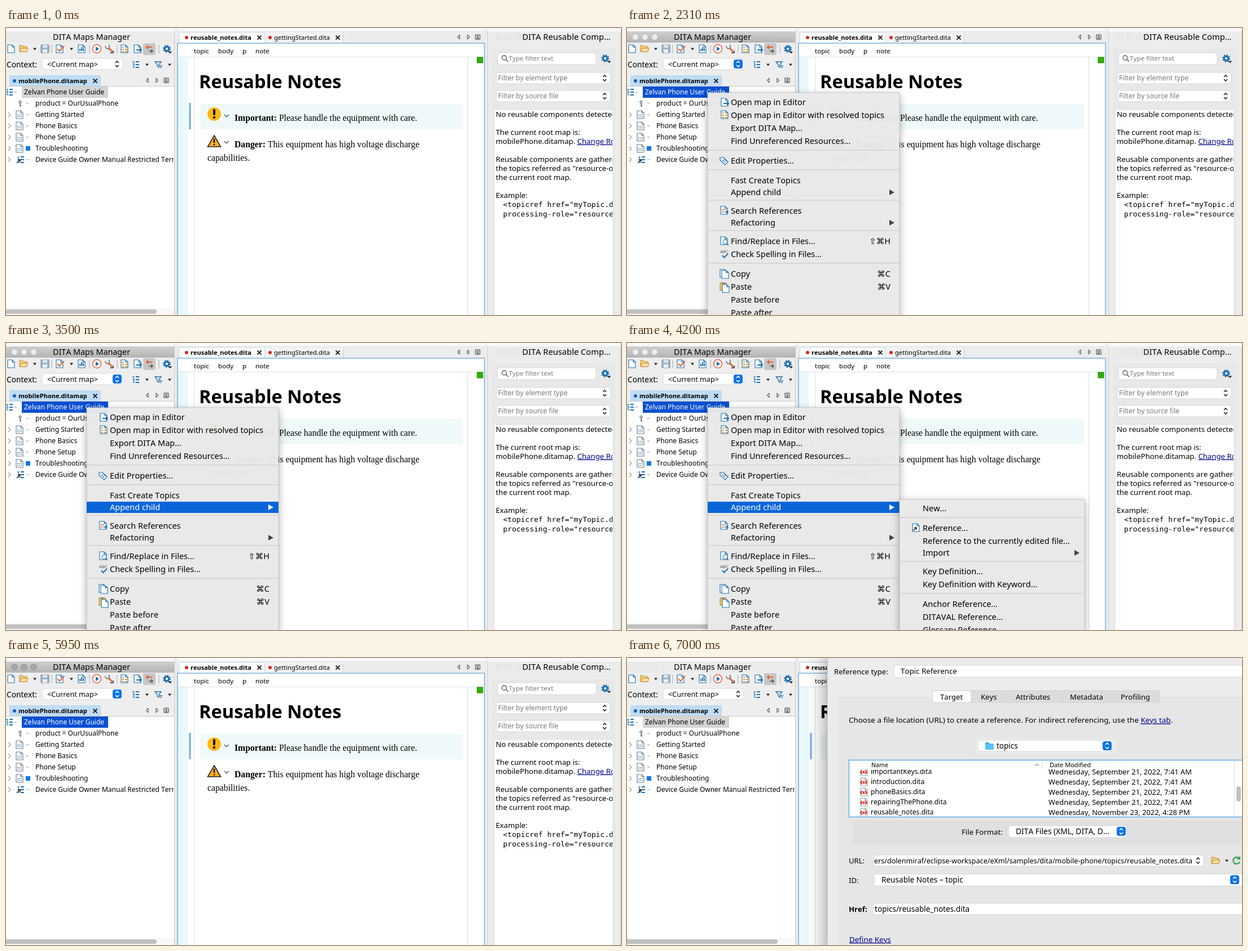
An HTML page that plays this animation: 1090 px wide and 510 px high, repeating every 8 s.

```html
<!DOCTYPE html>
<html lang="en">
<head>
<meta charset="utf-8">
<style>
html, body { margin: 0; width: 100%; height: 100%; overflow: hidden; background: #ececec; }
svg { display: block; width: 1090px; height: 510px; font-family: "Noto Sans", "DejaVu Sans", sans-serif; font-kerning: none; }
text { white-space: pre; }
.b { font-weight: 700; }
.serif { font-family: "Liberation Serif", serif; }
.mono { font-family: "DejaVu Sans Mono", monospace; }
.link { fill: #00008b; text-decoration: underline; }
.popup { filter: drop-shadow(0 4px 7px #0005); }
.sheet { filter: drop-shadow(0 8px 18px #0007); }
.item > .bar { fill: none; }
.on > .bar { fill: #0a66d8; }
.on > text, .on > .arrow { fill: #fff; }
</style>
</head>
<body>
<svg id="stage" viewBox="0 0 1090 510"></svg>
<script>
const BLUE = '#1b6fae', ORANGE = '#e0633a';

// Shape helpers; T takes the vertical centre of its capitals.
const T = (x, y, s, size = 12, attrs = '') =>
  `<text x="${x}" y="${y + size * .36}" font-size="${size}" ${attrs}>${s}</text>`;
const R = (x, y, w, h, fill, attrs = '') =>
  `<rect x="${x}" y="${y}" width="${w}" height="${h}" fill="${fill}" ${attrs} />`;
const P = (d, stroke, width = 1, fill = 'none') =>
  `<path d="${d}" stroke="${stroke}" stroke-width="${width}" fill="${fill}" />`;
const C = (x, y, r, fill, attrs = '') => `<circle cx="${x}" cy="${y}" r="${r}" fill="${fill}" ${attrs} />`;
const G = (id, body, attrs = '') => `<g id="${id}" ${attrs}>${body}</g>`;
const clip = (id, x, y, w, h, body) =>
  `<clipPath id="${id}">${R(x, y, w, h, '#000')}</clipPath><g clip-path="url(#${id})">${body}</g>`;

// Widgets
const field = (x, y, w, h, r = 5) => R(x, y, w, h, '#fff', `rx="${r}" stroke="#cfcfcf" stroke-width=".8"`);
const spin = (x, y, blue) => (blue ? R(x - 8, y - 8, 16, 16, '#0b72e7', 'rx="4"') : '') +
  P(`M${x - 3} ${y - 2}l3-3 3 3m0 4l-3 3-3-3`, blue ? '#fff' : '#222', 1.6);
const caret = (x, y) => P(`M${x - 3} ${y - 1.5}h6l-3 4z`, 'none', 0, '#222');
const cross = (x, y) => P(`M${x - 3.5} ${y - 3.5}l7 7m0-7l-7 7`, '#222', 1.8);
const tabTools = (x, y) => P(`M${x + 2} ${y - 4}v8l-4-4zM${x + 16} ${y - 4}v8l4-4z`, '#333') +
  P(`M${x + 30} ${y - 4}h8v8h-8zm2 2.5h4m-4 2h4m-4 2h4`, '#333');
const lights = (x, fill, stroke) => [0, 17, 34].map(d => C(x + d, 16, 5.5, fill, `stroke="${stroke}"`)).join('');

// Icons
const page = (x, y, color = BLUE) => P(`M${x} ${y}h8l4 4v10h-12zm8 0v4h4`, color, 1.1, '#fff');
const topic = (x, y) => page(x, y, '#6f7780') + P(`M${x + 2} ${y + 7.5}h2m1 0h2m1 0h2m-8 3h2m1 0h2m1 0h2`, BLUE);
const docArrow = (x, y, color = BLUE) => page(x, y) + P(`M${x + 4} ${y + 9}h9m-3-3l3 3-3 3`, color, 1.8);
const docList = (x, y) => page(x, y) + P(`M${x + 2} ${y + 4}h3m-3 4h3m2 0h4m-9 4h3m2 0h4`, '#e9981d', 2);
const folder = (x, y) => P(`M${x} ${y}h5l2 2h6v9h-13z`, '#b98b35', 1, '#f7cf73') +
  P(`M${x} ${y + 11}l3-6h12l-2 6z`, '#b98b35', 1, '#fbe0a0');
const wrench = (x, y) => P(`M${x} ${y + 2}a4 4 0 0 0 6 4a4 4 0 0 0 0-6`, '#777', 1.8) +
  P(`M${x + 6} ${y + 6}l6 6`, ORANGE, 3) + P(`M${x + 9} ${y + 14}h5v-4`, '#222', 1.4);
const gear = (x, y) => C(x, y, 3.8, 'none', `stroke="${BLUE}" stroke-width="3"`) +
  C(x, y, 6, 'none', `stroke="${BLUE}" stroke-width="2" stroke-dasharray="2.4 2.3"`);
const tree = (x, y) => P(`M${x} ${y}h4m-2 0v10h3m-3-5h3`, BLUE, 1.2) +
  P(`M${x + 6} ${y}h6m-6 5h6m-6 5h6`, BLUE, 1.8);
const funnel = (x, y) => P(`M${x} ${y}h11l-4 5v5l-3-2v-3zm8 7h5m-4 3h3`, BLUE, 1.3);

function mapsManager() {
  const rows = ['Getting Started', 'Phone Basics', 'Phone Setup', 'Troubleshooting',
    'Device Guide Owner Manual Restricted Terms'];
  const toolbar = page(3, 30) + folder(24, 31) + caret(51, 37) +
    R(62, 30, 14, 14, '#9db4c8', 'rx="1" stroke="#71889d"') + R(65, 30, 8, 5, '#dbe5ee') + R(65, 38, 8, 6, '#e9eff4') +
    page(89, 30) + P('M91 37l4 4 8-9', ORANGE, 2) + caret(116, 37) +
    page(128, 30) + P('M131 41v-4m3 4v-7m3 7v-5', BLUE, 2) +
    C(161, 37, 7.5, '#fff', `stroke="${ORANGE}" stroke-width="1.5"`) + P('M159 33v8l6-4z', 'none', 0, BLUE) +
    wrench(176, 30) + docList(204, 30) + docArrow(227, 30) +
    R(243, 27, 22, 21, '#c6c6c6', 'rx="3"') + P('M259 34h-10m3-3l-3 3 3 3', ORANGE, 2) +
    P('M253 41h7m-3-3l3 3-3 3', '#555', 1.6) + gear(285, 37) + caret(291, 43) +
    [81, 148, 197, 271].map(x => P(`M${x} 30v15`, '#aaa', 1)).join('');
  const items = rows.map((s, i) => {
    const y = 154 + i * 20, last = i === 4;
    return P(`M4 ${y - 4}l4 4-4 4`, '#999', 1.1) +
      (last ? tree(20, y - 5) + P(`M19 ${y + 6}l6-6m-4 0h4v4`, '#222', 1.4) : topic(18, y - 7)) +
      (i === 3 ? R(35, y - 4, 8, 8, '#0a78e6') : P(`M36 ${y}h4`, '#888')) + T(52, y, s);
  }).join('');
  return '<linearGradient id="steel" x2="0" y2="1"><stop stop-color="#d0d0d0" /><stop offset="1" stop-color="#b4b4b4" /></linearGradient>' +
    R(0, 0, 298, 510, '#eeeeee') + R(0, 0, 298, 6, '#f9f9f9') +
    R(0, 6, 298, 20, '#ebebeb') + G('activeTitle', R(0, 6, 298, 20, 'url(#steel)')) +
    G('dimLights', lights(15, '#ececec', '#e0e0e0')) + G('menuLights', lights(15, '#ededed', '#b8b8b8')) +
    G('onLights', lights(15, '#a6a6a6', '#9a9a9a')) +
    T(83, 16, 'DITA Maps Manager', 14.3) + toolbar +
    T(1, 65, 'Context:', 13.7) + field(64, 54, 143, 20) + T(73, 64, '&lt;Current map&gt;', 12.6) +
    G('plainSpin', spin(197, 64)) + G('blueSpin', spin(197, 64, true)) +
    tree(224, 60) + caret(250, 65) + funnel(264, 60) + caret(290, 65) +
    R(6, 84, 162, 20, '#bfdcf5') + C(15, 94, 3, '#1c5fb0') + T(22, 94, 'mobilePhone.ditamap', 11, 'class="b"') +
    cross(158, 94) + tabTools(250, 93) +
    R(0, 104, 298, 393, '#fff') + P('M0 103.5h298M298.5 6v504', '#c9c9c9') +
    clip('treeClip', 0, 104, 297, 393,
      tree(0, 109) + P('M15 114h4M36 134h4', '#888') +
      G('plainRow', R(28, 104, 153, 20, '#d4d4d4')) + G('blueRow', R(28, 104, 153, 20, '#0a50d2')) +
      `<g id="rootName">${T(32, 114, 'Zelvan Phone User Guide')}</g>` +
      C(25, 131.5, 2, 'none', 'stroke="#333"') + P('M25 134v5h2m-2-2h2', '#333') +
      T(52, 134, 'product = OurUsualPhone') + items) +
    R(0, 497, 298, 13, '#f8f8f8') + R(-5, 500, 272, 8, '#c1c1c1', 'rx="4"');
}

function editor() {
  const chevron = (x, y) => P(`M${x - 4} ${y - 2}l4 4 4-4`, '#444', 1.1);
  return R(304, 0, 545, 26, '#ececec') + R(304, 0, 545, 5, '#f9f9f9') +
    R(307, 8, 151, 19, '#fff') + R(459, 8, 139, 18, '#f2f2f2') + P('M306.5 26v-18h152v18m139-18v18', '#c5d6e5') +
    C(320, 17, 3, '#d9261c') + T(327, 17, 'reusable_notes.dita', 11, 'class="b"') + cross(449, 17) +
    C(468, 17, 3, '#d9261c') + T(475, 17, 'gettingStarted.dita', 11.15) + cross(588, 17) + tabTools(802, 16) +
    R(304, 27, 545, 483, '#fff') + R(305, 52, 17, 458, '#e9f8fc') +
    ['topic:333', 'body:376', 'p:419', 'note:442'].map(s => T(+s.split(':')[1], 41, s.split(':')[0], 11.6)).join('') +
    P('M305 51.5h543', '#d8e3ec') + P('M333.5 52v458M818.5 52v458', '#d3e0ee') +
    R(835, 52, 10, 10, '#30b000', 'stroke="#1d8500"') + P('M304 510V27h544v483', '#7fb1dc', 1.6) +
    T(342, 95, 'Reusable Notes', 32.6, 'class="b"') +
    R(344, 135, 466, 45, '#f0f9f9') + R(324, 133, 4, 47, '#8fbbe8') +
    C(369, 153, 12, '#fdb913') + R(367, 144, 4, 11, '#111', 'rx="1.5"') + C(369, 159, 2.2, '#111') + chevron(391, 156) +
    P('M369 191l11.5 20h-23z', '#222', 1.6, '#fbb01b') + P('M369 197v7m0 2v2.5', '#111', 2.6) + chevron(391, 203) +
    T(405, 159.5, '<tspan class="b">Important:</tspan> Please handle the equipment with care.', 15.7, 'class="serif"') +
    T(405, 206.5, '<tspan class="b">Danger:</tspan> This equipment has high voltage discharge', 15.7, 'class="serif"') +
    T(357, 230.5, 'capabilities.', 15.7, 'class="serif"');
}

function reusePanel() {
  const lines = [[153, 'No reusable components detected.'], [185, 'The current root map is:'],
    [201, 'mobilePhone.ditamap. <tspan class="link">Change Root Map</tspan>'],
    [233, 'Reusable components are gathered from'], [249, 'the topics referred as "resource-only" in'],
    [265, 'the current root map.'], [297, 'Example:']];
  const select = (y, s) => field(869, y - 10, 202, 20) + T(872, y, s, 12.1, 'fill="#777"') + spin(1061, y);
  return R(853, 0, 237, 510, '#ececec') + R(853, 0, 237, 6, '#f9f9f9') +
    P('M853.5 6v504M1089.5 6v504', '#cfcfcf') + lights(874, '#e9e9e9', '#dddddd') +
    T(915, 16, 'DITA Reusable Comp...', 14.7) + R(862, 37, 218, 480, '#e8e8e8', 'rx="4"') +
    field(871, 44, 175, 21) + C(883, 53, 4, 'none', 'stroke="#555" stroke-width="1.3"') + P('M886 56l4 4', '#555', 1.4) +
    T(891, 54, 'Type filter text', 11.65, 'fill="#777"') + gear(1062, 54) + caret(1069, 60) +
    select(89, 'Filter by element type') + select(121, 'Filter by source file') +
    R(866, 146, 209, 364, '#fff') +
    clip('helpClip', 866, 146, 209, 364, lines.map(([y, s]) => T(868, y, s, 13.2)).join('') +
      T(881, 313, '&lt;topicref href="myTopic.dita"', 13, 'class="mono"') +
      T(881, 330, 'processing-role="resource-only"/&gt;', 13, 'class="mono"'));
}

// Items: [centre y, label, right side, icon]
const mainItems = [
  [132, 'Open map in Editor', '', docArrow(167, 125)],
  [155, 'Open map in Editor with resolved topics', '', docList(167, 147)],
  [178, 'Export DITA Map...'], [201, 'Find Unreferenced Resources...'],
  [236, 'Edit Properties...', '', P('M165 230h6l8 8-5 5-9-8zm4 4l5 5m-2-7l5 5', BLUE, 1.2, '#fff')],
  [271, 'Fast Create Topics'], [292, 'Append child', '>'],
  [325, 'Search References', '', page(166, 317) + P('M168 323h6m-6 4h4', ORANGE, 1.5) + P('M173 327h6m-3-3l3 3-3 3', BLUE, 1.5)],
  [346, 'Refactoring', '>'],
  [379, 'Find/Replace in Files...', '⇧⌘H', page(166, 371) + C(174, 380, 4, '#fff', `stroke="${BLUE}"`) + P('M177 383l3 3', BLUE, 1.5)],
  [402, 'Check Spelling in Files...', '', T(165, 397, 'ABC', 7.5, 'style="fill:#555"') + P('M169 404l3 4 7-7', BLUE, 2)],
  [437, 'Copy', '⌘C', page(165, 429) + page(168, 431)],
  [460, 'Paste', '⌘V', R(165, 453, 11, 13, '#f4c765', 'stroke="#a87c2c"') + R(168, 452, 5, 3, '#888') + page(169, 456)],
  [483, 'Paste before'], [506, 'Paste after']];
const subItems = [
  [294, 'New...'], [329, 'Reference...', '', page(506, 321) + P('M507 333l6-5m-4 0h4v4', '#222', 1.5)],
  [352, 'Reference to the currently edited file...'], [373, 'Import', '>'],
  [406, 'Key Definition...'], [429, 'Key Definition with Keyword...'],
  [464, 'Anchor Reference...'], [487, 'DITAVAL Reference...'], [510, 'Glossary Reference...']];

function menu(id, x, y, w, items, rules) {
  const rows = items.map(([cy, label, end = '', icon = ''], i) => {
    const half = end === '>' ? 10 : 11.5;
    const right = end === '>' ? `<path class="arrow" d="M${x + w - 18} ${cy - 5}v10l9-5z" fill="#444" />`
      : T(x + w - 16, cy, end, 14.5, 'text-anchor="end"');
    return G(id + i, R(x, cy - half, w, half * 2, 'none', 'class="bar"') + icon +
      T(x + 41, cy, label, 14.5) + right, 'class="item"');
  }).join('');
  return G(id, R(x, y, w, 520 - y, '#ececec', 'class="popup" fill-opacity=".96" stroke="#bdbdbd" stroke-width=".8"') +
    rules.map(ry => P(`M${x} ${ry}h${w}`, '#d2d2d2', 1.6)).join('') + rows);
}

function dialog() {
  const files = ['importantKeys', 'introduction', 'phoneBasics', 'repairingThePhone', 'reusable_notes'];
  const rows = files.map((name, i) => {
    const y = 202 + i * 18;
    return page(414, y - 7, '#999') + P(`M417 ${y - 2}l-3 3 3 3m5-6l3 3-3 3`, '#d9261c', 1.8) + C(419.5, y + 1, 2, '#d9261c') +
      T(432, y, name + '.dita', 12.1) +
      T(747, y, i < 4 ? 'Wednesday, September 21, 2022, 7:41 AM' : 'Wednesday, November 23, 2022, 4:28 PM', 12.9);
  }).join('');
  const tabs = [[627, 'Keys'], [689, 'Attributes'], [785, 'Metadata'], [875, 'Profiling']];
  return G('dialog', R(355, -10, 760, 540, '#ececec', 'class="sheet" stroke="#b5b5b5"') +
    T(367, 24, 'Reference type:', 13.1) + field(473, 13, 640, 21) + T(485, 23, 'Topic Reference', 13.3) +
    R(375, 69, 720, 450, '#e6e6e6', 'rx="4"') +
    R(541, 58, 403, 21, '#dcdcdc', 'rx="5" stroke="#d0d0d0"') + field(541, 58, 69, 21) + T(555, 69, 'Target', 13.1) +
    P('M673.5 63v11M769.5 63v11M859.5 63v11', '#cacaca') + tabs.map(([x, s]) => T(x, 69, s, 13.1)).join('') +
    T(393, 110.5, 'Choose a file location (URL) to create a reference. For indirect referencing, use the <tspan class="link">Keys tab</tspan>.', 13.4) +
    R(618, 143, 249, 27, '#ececec') + field(622, 146, 239, 20) + R(635, 150, 7, 4, '#3ba3df', 'rx="1"') +
    R(635, 152, 15, 11, '#5ec0f2', 'rx="1.5"') + T(655, 156, 'topics', 13.5) + spin(851, 156, true) +
    R(393.5, 181.5, 720, 101, '#fff', 'stroke="#5aaae6" stroke-width="1.4"') +
    T(433, 190, 'Name', 10.7) + P('M723 192l3.5-4 3.5 4', '#555') + T(749, 190, 'Date Modified', 11) +
    P('M735.5 183v14M1076.5 183v98', '#dedede') +
    clip('fileClip', 395, 198, 681, 83, G('files', rows)) + R(1080, 228, 8, 27, '#c1c1c1', 'rx="4"') +
    R(401, 289, 700, 42, '#e0e0e0', 'rx="3"') + T(593, 309, 'File Format:', 13.2) +
    field(676, 298, 210, 21) + T(689, 308, 'DITA Files (XML, DITA, D...', 13.8) + spin(876, 308, true) +
    T(393, 360, 'URL:', 13.1) + field(437, 350, 585, 20, 3) + spin(1012, 360) +
    folder(1036, 354) + caret(1063, 360) + P('M1085 356a6 6 0 1 0 1 6m0-9v4h-5', '#35a143', 2.2) +
    T(393, 395, 'ID:', 13.1) + field(438, 384, 660, 21) + spin(1077, 394, true) +
    T(393, 446, 'Href:', 13.2, 'class="b"') + R(436, 436, 660, 20, '#fff', 'stroke="#d2d2d2" stroke-width=".8"') +
    G('paths', clip('urlClip', 438, 350, 566, 20, T(1002, 360,
      'ers/dolenmiraf/eclipse-workspace/eXml/samples/dita/mobile-phone/topics/reusable_notes.dita', 12.6, 'text-anchor="end"')) +
      T(439, 446, 'topics/reusable_notes.dita', 13.6)) +
    G('topicId', T(451, 394, 'Reusable Notes – topic', 13.6)) +
    T(394, 500, '<tspan class="link">Define Keys</tspan>', 13.4));
}

const stage = document.getElementById('stage');
stage.innerHTML = R(0, 0, 1090, 510, '#ececec') + mapsManager() + editor() + reusePanel() +
  menu('main', 143, 115, 340, mainItems, [217, 252, 306, 360, 418]) +
  menu('sub', 483, 278, 328, subItems, [310, 388, 445]) + dialog();

const el = id => document.getElementById(id);
const show = (id, on) => el(id).style.display = on ? '' : 'none';
const hover = (id, items, index) => items.forEach((_, i) => el(id + i).classList.toggle('on', i === index));

function render(t) {
  const active = t >= 1400 && t < 6370;
  const menuOpen = t >= 2310 && t < 5950;
  const fade = t < 5740 ? 1 : 1 - (Math.floor((t - 5740) / 70) + 1) / 4;

  for (const id of ['activeTitle', 'blueSpin', 'blueRow']) show(id, active);
  for (const id of ['dimLights', 'plainSpin', 'plainRow']) show(id, !active);
  show('onLights', active && !menuOpen);
  show('menuLights', menuOpen);
  el('rootName').style.fill = active ? '#fff' : '#000';

  show('main', menuOpen);
  show('sub', menuOpen && t >= 3640);
  el('main').style.opacity = el('sub').style.opacity = fade;
  hover('main', mainItems, Math.min(6, Math.floor((t - 3080) / 70)));
  hover('sub', subItems, t < 4830 ? -1 : t < 4970 ? 0 : t < 5040 ? -1 : t >= 5250 && t < 5320 ? 2 : 1);

  show('dialog', t >= 6090);
  show('paths', t >= 6370);
  show('files', t >= 6860);
  show('topicId', t >= 6860);
}

function tick() {
  render(performance.now() % 8000);
  requestAnimationFrame(tick);
}
tick();
</script>
</body>
</html>
```
